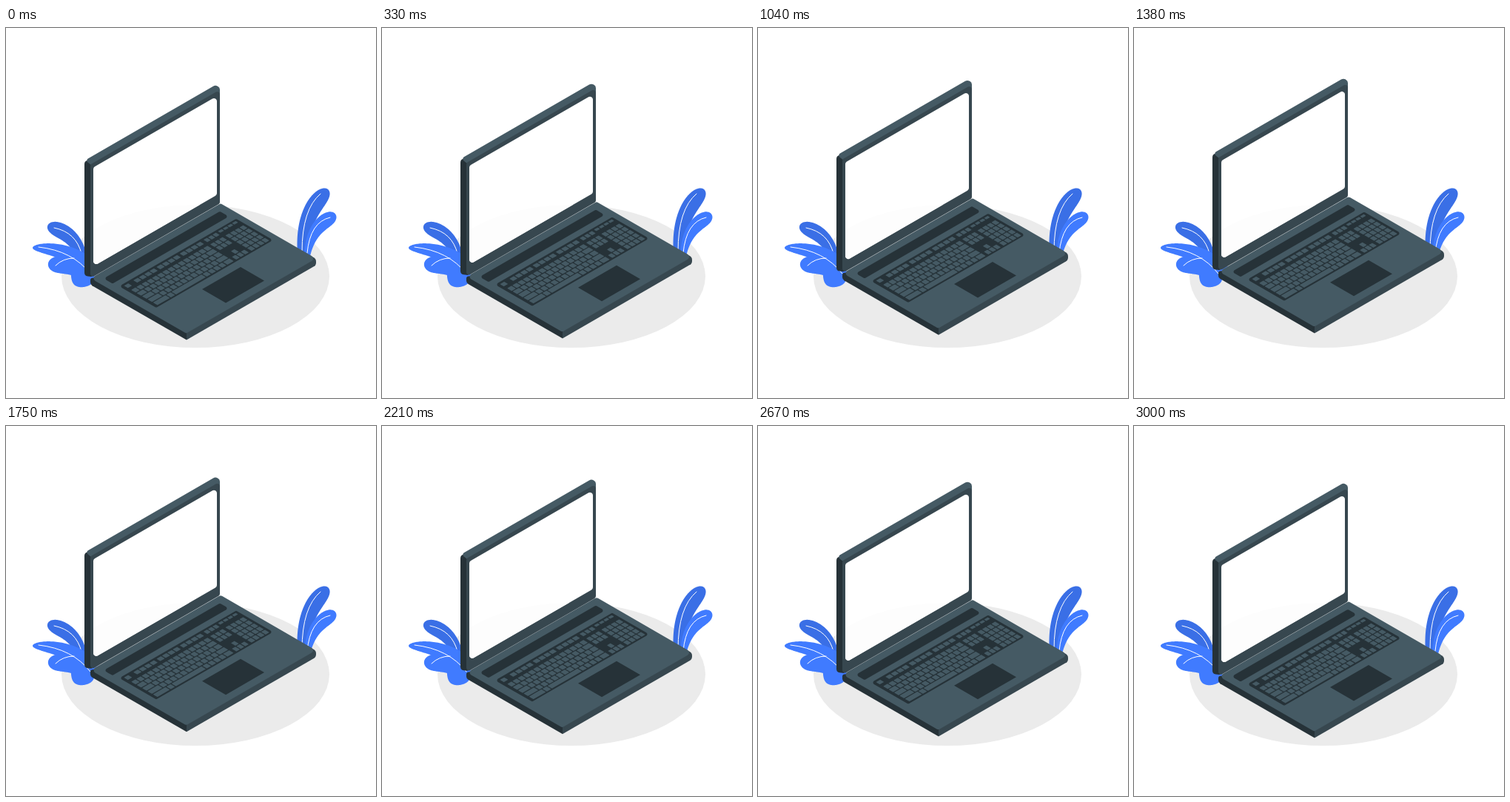
Recreate the animation shown at these times as an HTML page with a canvas. Size 500 px wide and 500 px high, loop 3040 ms.

```html
<!DOCTYPE html>
<html lang="en">
<head>
<meta charset="utf-8">
<title>Floating laptop</title>
<style>
  html, body { margin: 0; width: 100%; height: 100%; overflow: hidden; background: #fff; }
  canvas { display: block; width: 500px; height: 500px; }
</style>
</head>
<body>
<canvas id="stage"></canvas>
<script>
const canvas = document.getElementById('stage');
const ctx = canvas.getContext('2d');
const ratio = window.devicePixelRatio || 1;
canvas.width = canvas.height = 500 * ratio;

const LOOP = 3040, FLOAT = 3000, LIFT = 10, FPS = 24;
const ISO = Math.tan(Math.PI / 6);
const DARK = '#263238', MID = '#37474f', LIGHT = '#455a64';
const BLUE = '#407bff', SHADE = '#3a6fe6';

// Polygon of [x, y, radius] corners
function poly(color, pts) {
  const n = pts.length, a = pts[n - 1], b = pts[0];
  ctx.beginPath();
  ctx.moveTo((a[0] + b[0]) / 2, (a[1] + b[1]) / 2);
  pts.forEach((p, i) => {
    const q = pts[(i + 1) % n];
    ctx.arcTo(p[0], p[1], q[0], q[1], p[2] || 0);
  });
  ctx.closePath();
  ctx.fillStyle = color;
  ctx.fill();
}

// Flat isometric panel: its left corner, length to the back, depth to the front
function panel(color, x, y, len, depth, r) {
  poly(color, [
    [x, y, r],
    [x + len, y - len * ISO, r],
    [x + len + depth, y + (depth - len) * ISO, r],
    [x + depth, y + depth * ISO, r]
  ]);
}

// Upright isometric panel from its top left corner
function wall(color, x, y, w, h, r) {
  poly(color, [[x, y, r], [x + w, y - w * ISO, r], [x + w, y - w * ISO + h, r], [x, y + h, r]]);
}

// Blunt leaf round a curved spine; base is the share of the width at its foot
function leaf(color, [x0, y0, cx, cy, x1, y1], width, base) {
  const left = [], right = [], steps = 60;
  for (let i = 0; i <= steps; i++) {
    const s = Math.sin(i / steps * Math.PI / 2), q = 1 - s;
    const x = q * q * x0 + 2 * q * s * cx + s * s * x1;
    const y = q * q * y0 + 2 * q * s * cy + s * s * y1;
    const dx = q * (cx - x0) + s * (x1 - cx), dy = q * (cy - y0) + s * (y1 - cy);
    const k = width * (base + (1 - base) * s) * Math.sqrt(1 - s ** 6) / Math.hypot(dx, dy);
    left.push([x + dy * k, y - dx * k]);
    right.unshift([x - dy * k, y + dx * k]);
  }
  poly(color, [...left, ...right]);
}

function vein(x0, y0, cx, cy, x1, y1) {
  ctx.beginPath();
  ctx.moveTo(x0, y0);
  ctx.quadraticCurveTo(cx, cy, x1, y1);
  ctx.strokeStyle = '#fff';
  ctx.lineCap = 'round';
  ctx.stroke();
}

function shadow(color) {
  ctx.beginPath();
  ctx.ellipse(256, 335.5, 181, 96.5, 0, 0, Math.PI * 2);
  ctx.fillStyle = color;
  ctx.fill();
}

function plants() {
  leaf(SHADE, [104, 316, 96, 276, 56, 268], 13, 0.5);
  vein(102, 305, 95, 276, 65, 270);

  // three lobes of one leaf
  leaf(BLUE, [116, 330, 92, 298, 36, 297], 7.8, 1.7);
  leaf(BLUE, [112, 330, 85, 316, 57, 321], 13, 0.9);
  leaf(BLUE, [104, 315, 103, 335, 105, 350], 16, 1);
  vein(114, 332, 90, 301, 44, 296);
  vein(67, 321, 77, 311, 92, 311);

  leaf(SHADE, [401, 306, 400, 248, 436, 219], 14, 0.5);
  vein(400, 302, 400, 245, 425, 224);
  leaf(BLUE, [407, 308, 412, 266, 446, 253], 13, 0.3);
  vein(407, 304, 411, 262, 438, 256);
}

// Keyboard: u runs along the rows, v towards the user, both 0 to 1
const KB = { x: 153, y: 349, len: 158, depth: 50 };

function key(u, v, w, h) {
  const a = KB.len * u + 0.6, b = KB.depth * v + 0.6;
  panel(LIGHT, KB.x + a + b, KB.y + (b - a) * ISO, KB.len * w - 1.2, KB.depth * h - 1.2, 0.5);
}

function keyboard() {
  panel(DARK, KB.x, KB.y, KB.len, KB.depth, 2.5);
  const top = 0.235, step = 0.147, unit = 0.044, nav = 0.038, pad = 0.04;

  key(0.02, 0.04, unit, 0.13);
  for (let i = 0; i < 12; i++) {
    key(0.1 + i * 0.046 + Math.floor(i / 4) * 0.014, 0.04, 0.046, 0.13);
  }
  for (let i = 0; i < 3; i++) key(0.7 + i * nav, 0.04, nav, 0.13);
  for (let i = 0; i < 4; i++) key(0.825 + i * pad, 0.035, pad, 0.09);

  for (let r = 0; r < 5; r++) {
    const v = top + r * step;
    // staggered rows, the last key takes what is left
    for (let u = 0, w; u < 15; u += w) {
      w = u ? 1 : 1 + r * 0.4;
      if (r === 4 && u > 3 && u < 5) w = 6;
      if (15 - u - w < 1) w = 15 - u;
      key(0.02 + u * unit, v, w * unit, step);
    }
    for (let i = 0; i < 3; i++) {
      const arrowUp = r === 3 && i === 1;
      if (r < 2 || r === 4 || arrowUp) key(0.695 + i * nav, v, nav, step);
    }
    for (let i = 0; i < 4; i++) key(0.825 + i * pad, v, pad, step);
  }
}

function base() {
  poly(DARK, [[114, 338, 3], [180, 330], [250, 380], [244, 421.6], [114, 346.7, 5]]);
  poly(MID, [[244, 405], [400, 301], [419, 312, 6], [419, 320.6, 6], [244, 421.6]]);
  panel(LIGHT, 114.5, 338.3, 175.5, 129, 4);
  panel(DARK, 132, 338.5, 157, 12, 2.5);
  keyboard();
  panel(DARK, 265, 353, 52, 32, 0);
}

function lid(lift) {
  poly(DARK, [[106, 179.5, 5], [118, 178], [118, 336.5, 3], [106, 335, 5]]);
  poly(LIGHT, [[107, 178.7, 3], [283, 77, 6], [289, 80.5, 5], [289, 90], [116, 186]]);
  wall(MID, 114, 184.5, 175, 153.7, 3.5);
  wall('#fff', 118, 188.5, 167, 133.5, 4);

  // the ground shows faintly through the screen
  ctx.save();
  ctx.clip();
  ctx.translate(0, lift);
  shadow('#fdfdfd');
  ctx.restore();
}

// Linear rise and fall, then a short rest on the ground
function height(t) {
  const frame = Math.floor((t + 4.9) * FPS / 1000);
  const p = Math.min(1, frame * 1000 / FPS / FLOAT);
  return LIFT * (1 - Math.abs(1 - 2 * p));
}

function draw(t) {
  const lift = height(t % LOOP);
  ctx.setTransform(ratio, 0, 0, ratio, 0, 0);
  ctx.fillStyle = '#fff';
  ctx.fillRect(0, 0, 500, 500);
  shadow('#ebebeb');
  plants();
  ctx.translate(0, -lift);
  base();
  lid(lift);
}

const start = performance.now();
function tick() {
  draw(performance.now() - start);
  requestAnimationFrame(tick);
}
tick();
</script>
</body>
</html>
```
